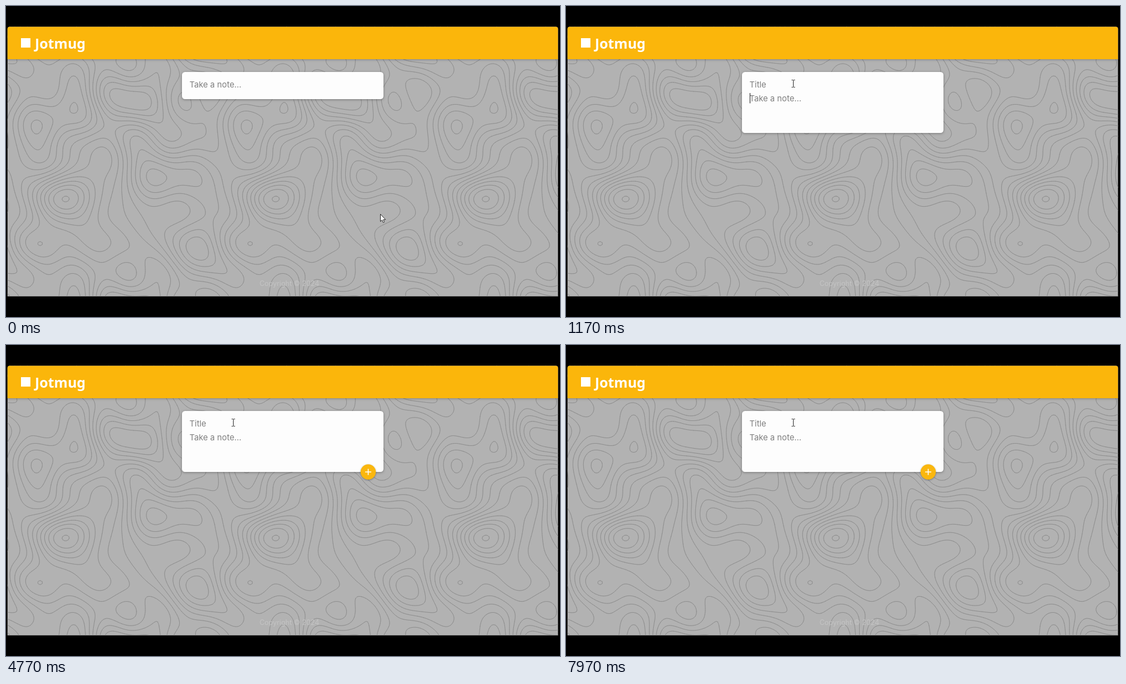
An HTML page that plays this animation: 998x561 px, repeating every 8 s.

```html
<!DOCTYPE html>
<html lang="en">
<head>
<meta charset="utf-8">
<title>Notes</title>
<style>
  html, body { margin: 0; width: 100%; height: 100%; overflow: hidden; background: #000; }
  svg { display: block; width: 100%; height: 100%; }
  text { font-family: Inter, sans-serif; }
  .hint { font-size: 14.8px; fill: #7f7f7f; }
  .brand { font: 600 25px "Noto Sans", sans-serif; fill: #fff; }
  .foot { font-size: 12.5px; fill: #c4c4c4; }
  #lines { fill: none; stroke: #8c8c8c; stroke-width: .9; stroke-linecap: round; }
  #card { filter: drop-shadow(0 1px 2px rgba(60, 60, 60, .5)); }
  #bar { filter: drop-shadow(0 0 2.5px rgba(0, 0, 0, .4)); }
  #add circle { filter: drop-shadow(0 1px 1.5px rgba(0, 0, 0, .35)); }
</style>
</head>
<body>
<svg viewBox="0 0 998 561">
  <defs>
    <clipPath id="page"><path d="M2.7 523.7V41.5a4 4 0 0 1 4-4H990.4a4 4 0 0 1 4 4V523.7Z"/></clipPath>
    <path id="tile"/>
  </defs>
  <rect width="998" height="561"/>
  <g clip-path="url(#page)">
    <rect x="2" y="37" width="994" height="488" fill="#b2b2b2"/>
    <g id="lines"></g>
    <text class="foot" x="510.5" y="504.5" text-anchor="middle">Copyright © 2024</text>
    <rect id="bar" x="2" y="37" width="994" height="59" fill="#fbb60b"/>
    <rect x="27" y="58" width="17" height="17" fill="#fff"/>
    <text class="brand" x="52" y="77">Jotmug</text>
  </g>
  <rect id="card" x="317" y="119" width="363" height="49" rx="5.5" fill="#fdfdfd"/>
  <text id="title" class="hint" x="330.5" y="147">Title</text>
  <text id="note" class="hint" x="330.5" y="147">Take a note...</text>
  <path id="caret" d="M331.5 157V175.5" stroke="#111"/>
  <g id="add">
    <circle r="13.7" fill="#fab70e"/>
    <path d="M-5.5 0H5.5M0-5.5V5.5" stroke="#fff" stroke-width="1.6"/>
  </g>
  <path id="arrow" d="M0 0V13.2L3 10.5 5 15.2 7.2 14.2 5.2 9.8H9.2Z" fill="#fff" stroke="#222" stroke-linejoin="round"/>
  <path id="beam" d="M-3-6.5H-1Q0-6.5 0-5.5Q0-6.5 1-6.5H3M0-5.5V5.5M-3 6.5H-1Q0 6.5 0 5.5Q0 6.5 1 6.5H3" fill="none" stroke="#222"/>
</svg>
<script>
const $ = id => document.getElementById(id);
const LOOP = 8000, PERIOD = 378.4, CELLS = 140;
const OPEN = 1130, ZOOM = 1180, ZOOM_TIME = 240;
const MOVE_START = 370, MOVE_END = 840;
const BLINK_START = 1072, BLINK = 528;

let seed = 7;
const random = () => (seed = seed * 16807 % 2147483647) / 2147483647;

// The relief: rolling waves with a few peaks and hollows, repeating every PERIOD
const waves = Array.from({ length: 10 }, () => {
  const turn = random() * Math.PI, pitch = 2 + random() * 2.5;
  return {
    a: Math.round(pitch * Math.cos(turn)),
    b: Math.round(pitch * Math.sin(turn)),
    phase: random() * 2 * Math.PI
  };
});
const hills = [[188, 134], [84, 350], [139, 315], [141, 405], [245, 180]];
const hollows = [[127, 141], [76, 225], [266, 313], [378, 318], [350, 430]];

const wrap = d => d - PERIOD * Math.round(d / PERIOD);
const bump = (x, y, [cx, cy]) => 4.5 * Math.exp(-(wrap(x - cx) ** 2 + wrap(y - cy) ** 2) / (2 * 34 ** 2));

function height(x, y) {
  const k = 2 * Math.PI / PERIOD;
  let h = 0;
  for (const w of waves) h += .38 * Math.sin((w.a * x + w.b * y) * k + w.phase);
  for (const p of hills) h += bump(x, y, p);
  for (const p of hollows) h -= bump(x, y, p);
  return h;
}

// Contour lines of one repeating tile, by marching squares
function contours() {
  const step = PERIOD / CELLS, grid = [];
  for (let j = 0; j <= CELLS; j++) {
    grid.push(Array.from({ length: CELLS + 1 }, (_, i) => height(i * step, j * step)));
  }
  const corners = [[0, 0], [1, 0], [1, 1], [0, 1]];
  let d = "";
  for (let j = 0; j < CELLS; j++) for (let i = 0; i < CELLS; i++) {
    const h = corners.map(([x, y]) => grid[j + y][i + x]);
    const top = Math.max(...h);
    for (let level = Math.floor(Math.min(...h)) + .5; level < top; level++) {
      const hits = [];
      corners.forEach(([x, y], k) => {
        const n = (k + 1) % 4;
        if ((h[k] < level) === (h[n] < level)) return;
        const p = (level - h[k]) / (h[n] - h[k]);
        const px = i + x + (corners[n][0] - x) * p, py = j + y + (corners[n][1] - y) * p;
        hits.push((px * step).toFixed(1) + " " + (py * step).toFixed(1));
      });
      for (let k = 0; k + 1 < hits.length; k += 2) d += `M${hits[k]}L${hits[k + 1]}`;
    }
  }
  return d;
}

$("tile").setAttribute("d", contours());
for (let n = 0; n < 6; n++) {
  const use = document.createElementNS("http://www.w3.org/2000/svg", "use");
  use.setAttribute("href", "#tile");
  use.setAttribute("x", n % 3 * PERIOD);
  use.setAttribute("y", Math.floor(n / 3) * PERIOD);
  $("lines").append(use);
}

const clamp = v => Math.min(1, Math.max(0, v));
const mix = (a, b, p) => a + (b - a) * p;
const show = (id, on) => $(id).setAttribute("visibility", on ? "visible" : "hidden");
const place = (id, x, y, scale = 1) =>
  $(id).setAttribute("transform", `translate(${x} ${y}) scale(${scale})`);

function draw(t) {
  const open = t >= OPEN;
  $("card").setAttribute("height", open ? 110 : 49);
  $("note").setAttribute("y", open ? 171.5 : 147);
  show("title", open);
  show("caret", open && Math.floor((t - BLINK_START) / BLINK) % 2 === 0);

  const zoom = 1 - (1 - clamp((t - ZOOM) / ZOOM_TIME)) ** 3;
  show("add", zoom > 0);
  place("add", 652.5, 229, zoom);

  const p = clamp((t - MOVE_START) / (MOVE_END - MOVE_START));
  const ease = p * p * (3 - 2 * p);
  const x = mix(674.5, 409.5, ease), y = mix(375.5, 140, ease);
  const overText = y < 160;
  show("arrow", !overText);
  show("beam", overText);
  place("arrow", x, y);
  place("beam", x, y);
}

function frame() {
  draw(performance.now() % LOOP);
  requestAnimationFrame(frame);
}
frame();
</script>
</body>
</html>
```
